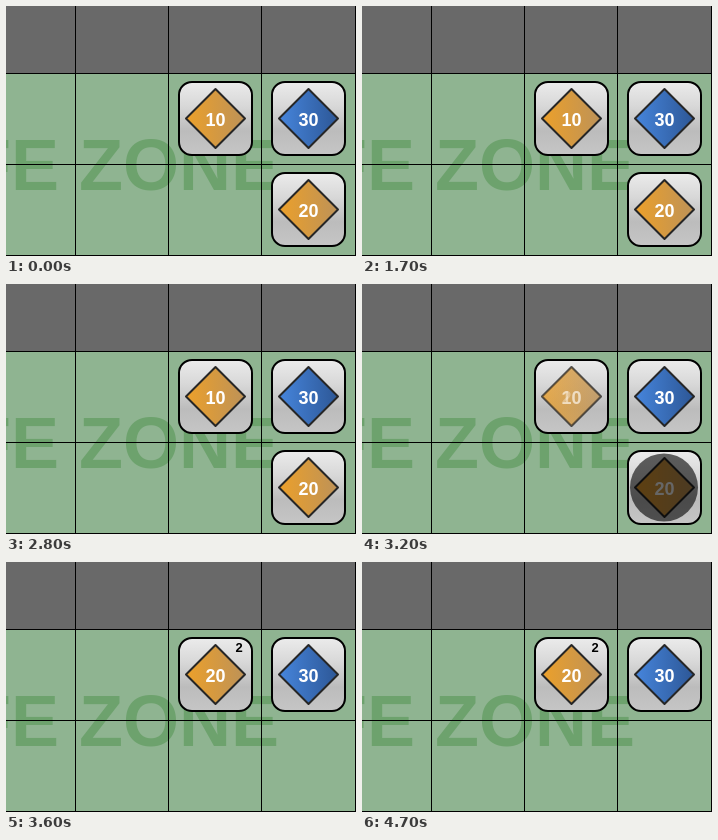
Recreate the animation shown at these times as an HTML page with a canvas. Size 350 px wide and 250 px high, loop 5200 ms.

```html
<!DOCTYPE html>
<html lang="en">
<head>
<meta charset="utf-8">
<title>Stacking pieces</title>
<style>
html, body { margin: 0; width: 100%; height: 100%; overflow: hidden; }
canvas { display: block; }
</style>
</head>
<body>
<canvas id="stage" width="350" height="250"></canvas>
<script>
const ctx = document.getElementById('stage').getContext('2d');
const LOOP = 5200;
const ORANGE = ['#eca02a', '#bd9258'];
const BLUE = ['#4685dc', '#2d5796'];

function gradient(x0, y0, x1, y1, colors) {
  const g = ctx.createLinearGradient(x0, y0, x1, y1);
  colors.forEach((c, i) => g.addColorStop(i / (colors.length - 1), c));
  return g;
}

function text(str, x, y, size, color, align = 'center') {
  ctx.font = `bold ${size}px "Liberation Sans", Arial, sans-serif`;
  ctx.textAlign = align;
  ctx.fillStyle = color;
  ctx.fillText(str, x, y);
}

function box(x, y, w, h, r, fill, line) {
  ctx.beginPath();
  ctx.roundRect(x, y, w, h, r);
  ctx.fillStyle = fill;
  ctx.fill();
  ctx.strokeStyle = '#000';
  ctx.lineWidth = line;
  ctx.stroke();
}

function diamond(x, y, rx, ry, colors, line) {
  ctx.beginPath();
  ctx.moveTo(x - rx, y);
  ctx.lineTo(x, y - ry);
  ctx.lineTo(x + rx, y);
  ctx.lineTo(x, y + ry);
  ctx.closePath();
  ctx.fillStyle = gradient(x - rx, y, x + rx, y, colors);
  ctx.fill();
  ctx.strokeStyle = '#262626';
  ctx.lineWidth = line;
  ctx.lineJoin = 'round';
  ctx.stroke();
}

function tile(x, y) {
  const shade = gradient(x, y, x, y + 75, ['#ececec', '#d8d8d8', '#bcbcbc', '#c6c6c6']);
  box(x + 1, y + 1, 73, 73, 13, shade, 2);
}

function face(x, y, value, colors, alpha = 1) {
  ctx.globalAlpha = alpha;
  diamond(x + 37.5, y + 37.5, 29.5, 29.5, colors, 2);
  text(value, x + 37.5, y + 44.5, 18, '#fff');
  ctx.globalAlpha = 1;
}

function board() {
  ctx.fillStyle = '#8fb491';
  ctx.fillRect(0, 0, 350, 250);
  ctx.fillStyle = '#696969';
  ctx.fillRect(0, 0, 350, 67);
  text('SAFE ZONE', 273, 184, 72, '#6da26d', 'right');
  ctx.fillStyle = '#000';
  for (const x of [69, 162, 255, 349]) ctx.fillRect(x, 0, 1, 250);
  for (const y of [67, 158, 249]) ctx.fillRect(0, y, 350, 1);
}

// The piece being moved, dimmed by a disc and fading away.
function leavingPiece(fade) {
  ctx.save();
  const layer = new Path2D();
  layer.arc(302, 203.5, 34, 0, 7);
  ctx.globalAlpha = fade;
  tile(265, 166);
  face(265, 166, '20', ORANGE, fade);
  ctx.globalAlpha = fade;
  ctx.fillStyle = 'rgba(0,0,0,.6)';
  ctx.fill(layer);
  ctx.restore();
}

function tooltip(x, y, total, count) {
  const extra = (count - 1) * 8;
  ctx.fillStyle = 'rgba(0,0,0,.6)';
  ctx.fillRect(x, y, 105, 73 + extra);
  text(`Total value is ${total}`, x + 7, y + 14, 11.5, '#fff', 'left');
  for (let i = count - 1; i >= 0; i--) {
    const top = y + 23.5 + i * 8;
    box(x + 30.5, top + 7, 44, 24, 6, gradient(0, top + 20, 0, top + 31, ['#d0d0d0', '#8c8c8c']), 1);
    box(x + 30.5, top, 44, 24, 6, gradient(0, top, 0, top + 24, ['#f0f0f0', '#c4c4c4']), 1);
    diamond(x + 52.5, top + 12, 18, 9.5, ORANGE, 1);
  }
  text(`${count} piece${count > 1 ? 's' : ''} in stack`, x + 7, y + 68 + extra, 11.5, '#fff', 'left');
}

function draw(t) {
  const moving = t >= 3200;
  const k = moving ? Math.min(4, Math.floor((t - 3200) / 100)) / 4 : 0;
  const mix = moving ? 0.3 + 0.7 * k : 0;

  board();
  tile(172, 75);
  face(172, 75, '10', ORANGE, 1 - mix);
  face(172, 75, '20', ORANGE, mix);
  ctx.globalAlpha = k;
  text('2', 233, 90, 13, '#000');
  ctx.globalAlpha = 1;

  tile(265, 75);
  face(265, 75, '30', BLUE);

  if (!moving) {
    tile(265, 166);
    face(265, 166, '20', ORANGE);
  } else if (k < 1) {
    leavingPiece(1 - k);
  }

  if (t >= 600 && t < 1700) tooltip(194, 182, 20, 1);
  if (t >= 2000 && t < 2800) tooltip(214, 89, 10, 1);
  if (t >= 4000 && t < 4700) tooltip(196, 94, 30, 2);
}

const start = performance.now();
function tick() {
  draw((performance.now() - start) % LOOP);
  requestAnimationFrame(tick);
}
tick();
</script>
</body>
</html>
```
